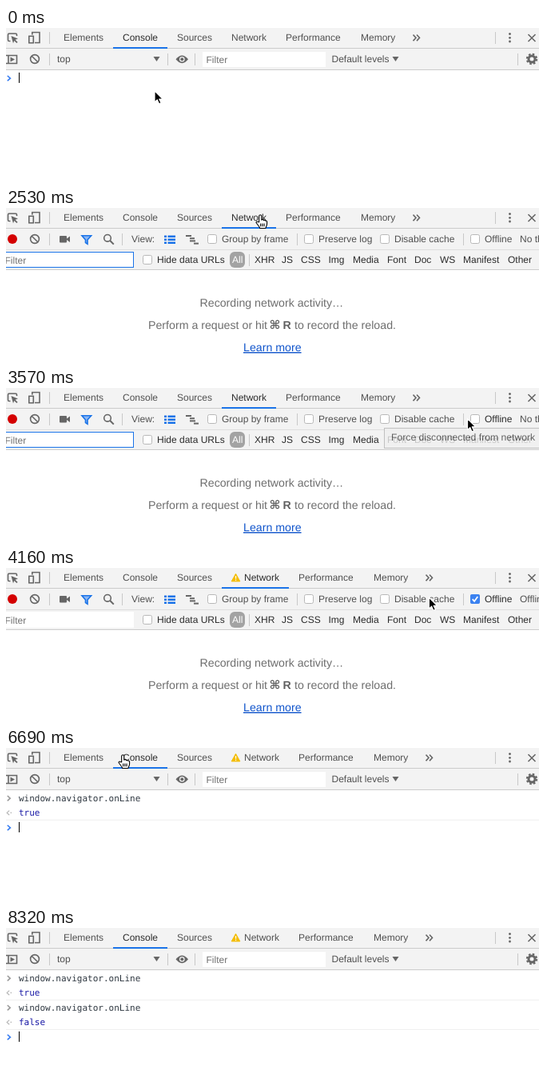
Write an HTML page that moves like this. It is 667 px wide and 191 px high and loops after 8.47 s.

```html
<!DOCTYPE html>
<html lang="en">
<head>
<meta charset="utf-8">
<title>DevTools: going offline</title>
<style>
  html, body { margin: 0; width: 100%; height: 100%; overflow: hidden; background: #fff; }
  svg { display: block; width: 667px; height: 191px; }
  text {
    font: 12px "Liberation Sans", Arial, sans-serif; fill: #505050;
    white-space: pre; text-rendering: geometricPrecision;
  }
  .dark { fill: #2c2c2c; }
  .hint { fill: #707070; }
  .code { font: 11px "DejaVu Sans Mono", monospace; fill: #303942; }
  .value { fill: #1a1aa6; }
  .big { font-size: 14.2px; fill: #6e6e6e; }
  .key { font-weight: bold; fill: #606060; }
  .symbol { font: bold 15px "DejaVu Sans", sans-serif; fill: #606060; }
  .link { fill: #15c; text-decoration: underline; }
  .pill { fill: #fff; }
  .line { fill: none; stroke: #666; stroke-width: 1.6; }
  .solid { fill: #666; }
</style>
</head>
<body>
<svg id="stage" viewBox="0 0 667 191"></svg>
<script>
const LOOP = 8470, STEP = 147.83;
const COMMAND = 'window.navigator.onLine';
const BLUE = '#1a73e8';
const stage = document.getElementById('stage');

const text = (x, y, s, cls = '') => `<text x="${x}" y="${y}" class="${cls}">${s}</text>`;
const path = (d, cls = 'line', more = '') => `<path d="${d}" class="${cls}" ${more}/>`;
const rect = (x, y, w, h, fill, more = '') =>
  `<rect x="${x}" y="${y}" width="${w}" height="${h}" fill="${fill}" ${more}/>`;
const circle = (x, y, r, cls = 'line', more = '') =>
  `<circle cx="${x}" cy="${y}" r="${r}" class="${cls}" ${more}/>`;
const group = (id, body) => `<g id="${id}">${body}</g>`;
const divider = (x, y) => rect(x, y, 1, 15, '#c8c8c8');
const triangle = (x, y) => path(`M${x} ${y}h8l-4 6z`, 'solid');
const checkbox = (x, y) =>
  rect(x + .5, y + .5, 11, 11, '#fff', 'rx="2" stroke="#b8b8b8"');
const clearIcon = circle(36, 39, 5.4) + path('M32.2 35.2l7.6 7.6');

// Tab strip: name, text start, text width
const tabs = [
  ['Elements', 72, 50], ['Console', 146, 44], ['Sources', 214, 44],
  ['Network', 282, 44], ['Performance', 350, 69], ['Memory', 444, 43]
];

const strip =
  rect(0, 0, 667, 25, '#f3f3f3') + rect(0, 25, 667, 1, '#ccc') +
  rect(0, 0, 0, 25, '#e6e6e6', 'id="hover"') +
  path('M5.5 16.5H4A1.5 1.5 0 0 1 2.5 15V8.5A1.5 1.5 0 0 1 4 7H12A1.5 1.5 0 0 1 13.5 8.5V10') +
  path('M6.5 10l8.5 3.6-3.4 1.2 3 3-1.3 1.3-3-3-1.3 3.2z', 'solid') +
  group('device', path('M32.8 8.5V5.5H42V18.5H36') + path('M28.8 10.2h5.5v8.6h-5.5z')) +
  divider(54, 5) +
  tabs.map(([name, x], i) => `<text id="tab${i}" x="${x}" y="16">${name}</text>`).join('') +
  group('warning',
    path('M287.5 7.2l5.3 9.6h-10.6z', '', 'fill="#f4bd00" stroke="#f4bd00" stroke-linejoin="round"') +
    rect(287, 10, 1.2, 3.6, '#fff') + rect(287, 14.6, 1.2, 1.3, '#fff')) +
  group('more', path('M509.5 8.5l3.5 3.8-3.5 3.8M514 8.5l3.5 3.8-3.5 3.8')) +
  rect(0, 24, 0, 2, BLUE, 'id="underline"') +
  divider(612, 5) +
  [7.5, 12.3, 17].map(y => circle(630.5, y, 1.4, 'solid')).join('') +
  path('M653.5 8l9 9m0-9l-9 9');

const consoleBar =
  rect(0, 26, 667, 26, '#f3f3f3') + rect(0, 52, 667, 1, '#ccc') +
  path('M-1 34.5H13.5V44.5H-1M3 34.5v10') + path('M5.5 36.5l5.5 3-5.5 3z', 'solid') + clearIcon +
  divider(54, 32) + text(64, 43, 'top') + triangle(184.5, 36) + divider(202, 32) +
  path('M212.5 39.3Q220.3 29.5 228 39.3Q220.3 49 212.5 39.3Z', 'solid') +
  circle(220.3, 39.3, 3.3, '', 'fill="#f3f3f3"') + circle(220.3, 39.3, 2, 'solid') +
  divider(236, 32) + rect(246, 30, 154, 19, '#fff') + text(250.5, 44, 'Filter', 'hint') +
  text(407.5, 43, 'Default levels') + triangle(483.5, 36) + divider(640, 32) +
  circle(658, 39, 4, 'line', 'style="stroke-width:3"') +
  circle(658, 39, 6.2, 'line', 'style="stroke-width:2" stroke-dasharray="2.6 2.27"');

// One executed command with its result
const entry = (id, y, value) => group(id,
  path(`M1.8 ${y - 3}l3.4 3.2-3.4 3.2`, 'line', 'style="stroke:#999"') +
  text(16, y + 4, COMMAND, 'code') +
  path(`M4.2 ${y + 15.6}l-3 2.8 3 2.8`, 'line', 'style="stroke:#b5b5b5;stroke-width:1.2"') +
  circle(6.3, y + 18.4, .8, '', 'fill="#b5b5b5"') +
  text(16, y + 22, value, 'code value') + rect(0, y + 27, 667, 1, '#f0f0f0'));

const consolePanel = consoleBar + entry('first', 63, 'true') + entry('second', 100, 'false') +
  group('prompt',
    path('M1.8 60l3.6 3.2-3.6 3.2', 'line', 'style="stroke:#367cf1"') +
    `<text id="typed" x="16" y="67" class="code">${COMMAND}</text>` +
    rect(16, 56, 1, 13, '#000', 'id="caret"'));

const types = [
  ['XHR', 311], ['JS', 345], ['CSS', 369], ['Img', 403.5], ['Media', 434], ['Font', 477],
  ['Doc', 511], ['WS', 543], ['Manifest', 572], ['Other', 628]
];
const listRow = i => rect(198, 34.5 + 4 * i, 3, 2.5, BLUE) + rect(202.5, 34.5 + 4 * i, 9.5, 2.5, BLUE);
const fallRow = (x, y, w) => rect(x, y, w, 2, '#666');

const networkPanel =
  rect(0, 26, 667, 51, '#f3f3f3') + rect(0, 52, 667, 1, '#ddd') + rect(0, 77, 667, 1, '#ccc') +
  circle(8, 39, 6, '', 'fill="#d40000"') + clearIcon +
  divider(54, 32) +
  rect(67, 35, 9, 8.5, '#666', 'rx="1"') + path('M75 39.2l5-3.6v7.4z', 'solid') +
  path('M95 34.8h11.6l-4.6 5.2v5.2l-2.5-1.6V40z', 'line', `style="stroke:${BLUE};fill:#8ab6f4"`) +
  circle(127, 37.8, 4.3) + path('M130.2 41l4.6 4.6', 'line', 'style="stroke-width:2"') +
  divider(145, 32) + text(157, 43, 'View:') + [0, 1, 2].map(listRow).join('') +
  fallRow(225, 34, 7) + fallRow(230, 37.2, 6) + fallRow(230, 40.4, 7) + fallRow(235, 43.6, 6) +
  checkbox(252, 33) + text(270, 43, 'Group by frame') + divider(364, 32) +
  checkbox(373, 33) + text(391, 43, 'Preserve log') +
  checkbox(468, 33) + text(486, 43, 'Disable cache') + divider(572, 32) +
  checkbox(581, 33) + group('tick',
    rect(581, 33, 12, 12, '#3b82f0', 'rx="2"') +
    path('M583.7 39.2l2.4 2.6 4.2-5.8', 'line', 'style="stroke:#fff;stroke-width:1.7"')) +
  '<text id="offline" x="599" y="43">Offline</text>' +
  '<text id="throttle" x="643" y="43"></text>' +
  rect(-4, 55.5, 163.5, 19, '#fff', 'id="field"') + text(-1.5, 70, 'Filter', 'hint') +
  checkbox(171, 59) + text(189, 69, 'Hide data URLs', 'dark') +
  rect(280, 55, 19, 20, '#a3a3a3', 'rx="6"') + text(283, 69, 'All', 'pill') +
  divider(304, 58) + types.map(([s, x]) => text(x, 69, s, 'dark')).join('') +
  text(242.5, 124, 'Recording network activity…', 'big') +
  text(178, 152, 'Perform a request or hit', 'big') + text(329.5, 152, '⌘', 'symbol') +
  text(346.5, 152, 'R', 'big key') + text(361, 152, 'to record the reload.', 'big') +
  text(297, 180, 'Learn more', 'big link');

const tooltip = group('tooltip',
  rect(473.5, 50.5, 196, 25, '#f0f0f0', 'stroke="#b4b4b4"') +
  '<text x="482" y="66" style="font-size:12.2px;fill:#404040">Force disconnected from network</text>');

const cursors =
  group('arrow', path('M0 0V14.2L3.3 11.2L5.6 16.4L8.1 15.3L5.8 10.3H10.2Z', '',
    'fill="#000" stroke="#fff" stroke-width="1.2" stroke-linejoin="round"')) +
  group('hand', path('M-1.2 8V1.2a1.4 1.4 0 0 1 2.8 0V5.5l.3-.1a1.2 1.2 0 0 1 2.2.6a1.2 1.2 0 0 1 2 .5' +
    'a1.1 1.1 0 0 1 1.7 1V10c0 2-1.2 3-1.5 5H-.2C-.7 13-3.2 10.5-4.3 8.8C-5 7.5-3.4 6.8-2.5 7.8Z' +
    'M.6 9.5v3.5M2.6 9.5v3.5M4.6 9.5v3.5', '',
    'fill="#fff" stroke="#000" stroke-width="1" stroke-linejoin="round" transform="scale(1.1)"'));

stage.innerHTML = rect(0, 0, 667, 191, '#fff') + strip +
  group('console', consolePanel) + group('network', networkPanel) + tooltip + cursors;

const el = {};
stage.querySelectorAll('[id]').forEach(n => el[n.id] = n);
const show = (node, on) => node.setAttribute('display', on ? 'inline' : 'none');
const move = (node, x, y) => node.setAttribute('transform', `translate(${x} ${y})`);
const within = (t, spans) => spans.some(([a, b]) => t >= a && t < b);

// Pointer: time, x, y
const route = [
  [0, 186, 79], [1200, 186, 79], [1800, 312.5, 61], [2240, 318, 9], [2830, 318, 9],
  [3420, 575, 37], [3570, 577.5, 38.5], [3860, 584, 40], [4020, 584, 40],
  [4760, 40, 10], [5050, 146, 9], [7440, 146, 9], [7880, 444, 105.5], [LOOP, 444, 105.5]
];

// The picture is held between steps, as in a screen recording
function hold(t, start, end) {
  if (t < start || t >= end) return t;
  return start + Math.floor((t - start + 9.9) / STEP) * STEP;
}

function pointer(t) {
  t = hold(hold(t, 1800, 5490), 7580, 8320);
  const i = Math.max(1, route.findIndex(p => p[0] > t));
  const [t0, x0, y0] = route[i - 1], [t1, x1, y1] = route[i];
  const u = (t - t0) / (t1 - t0), k = u * u * (3 - 2 * u);
  return [x0 + (x1 - x0) * k, y0 + (y1 - y0) * k];
}

function drawTabs(active, offline, x, y, visible) {
  let hovered = -1;
  tabs.forEach(([, left, width], i) => {
    const icon = offline && i === 3 ? 16 : 0;
    const shift = offline && i > 2 ? 16 : 0;
    const start = left - 12 + shift - icon, size = width + 24 + icon;
    const over = visible && y < 25 && x >= start && x < start + size;
    if (over) hovered = i;
    el['tab' + i].setAttribute('x', left + shift);
    el['tab' + i].setAttribute('class', over || i === active ? 'dark' : '');
    for (const [bar, on] of [[el.underline, i === active], [el.hover, over && i !== active]]) {
      if (!on) continue;
      bar.setAttribute('x', start);
      bar.setAttribute('width', size);
    }
  });
  show(el.hover, hovered >= 0 && hovered !== active);
  show(el.warning, offline);
  move(el.more, offline ? 16 : 0, 0);
  return hovered >= 0;
}

function update(t) {
  const onNetwork = t >= 2530 && t < 5490;
  const offline = t >= 3860;
  const done = t < 1200 ? 0 : t < 7140 ? 1 : 2;
  const typing = within(t, [[300, 1200], [6840, 7140]]);

  const [x, y] = pointer(t);
  const visible = !within(t, [[1200, 1800], [8320, LOOP]]);
  const onTab = drawTabs(onNetwork ? 3 : 1, offline, x, y, visible);
  show(el.arrow, visible && !onTab);
  show(el.hand, visible && onTab);
  move(el.arrow, x, y);
  move(el.hand, x, y);
  el.device.style.filter = visible && y < 25 && x > 24 && x < 46 ? 'brightness(.5)' : 'none';

  show(el.console, !onNetwork);
  show(el.network, onNetwork);
  show(el.first, done > 0);
  show(el.second, done > 1);
  move(el.prompt, 0, done * 37);
  show(el.typed, typing);
  el.caret.setAttribute('x', typing ? 168 : 16);
  show(el.caret, within(t, [[0, 900], [1200, 1800], [5640, 6090], [6690, 7730], [8170, LOOP]]));

  show(el.tick, offline);
  el.throttle.textContent = offline ? 'Offline' : 'No throttling';
  el.offline.setAttribute('class', t >= 3420 ? 'dark' : '');
  el.field.setAttribute('stroke', offline ? '#fff' : BLUE);
  show(el.tooltip, t >= 3570 && t < 3860);
  el.tooltip.setAttribute('opacity', t < 3715 ? .8 : 1);
}

const begin = performance.now();
function frame() {
  update((performance.now() - begin) % LOOP);
  requestAnimationFrame(frame);
}
frame();
</script>
</body>
</html>
```
